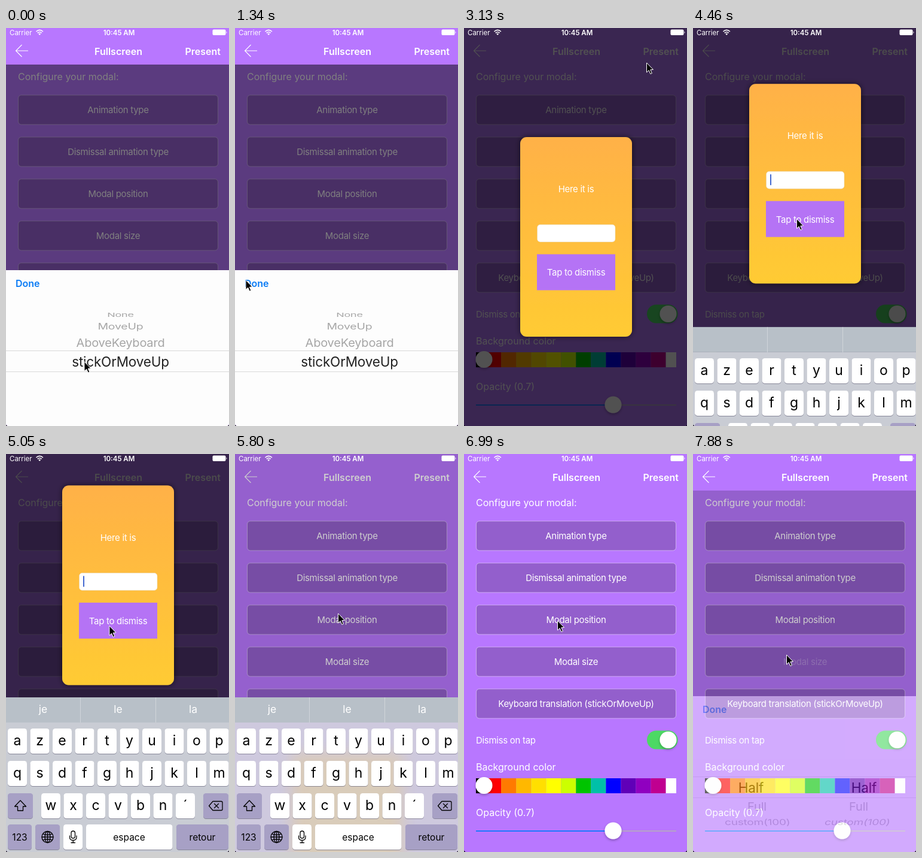
Recreate the animation shown at these times as an HTML page. Size 373 by 664 pixels, loop 8000 ms.

```html
<!DOCTYPE html>
<html lang="en">
<head>
<meta charset="utf-8">
<title>Modal configurator</title>
<style>
  html, body { margin: 0; width: 100%; height: 100%; overflow: hidden; background: #000; }
  svg { display: block; width: 100%; height: 100%; }
  text { font-family: Inter, "Open Sans", sans-serif; fill: #fff; white-space: pre; }
  .mid { text-anchor: middle; }
  .nav { font-size: 16px; font-weight: 600; }
  .head { font-size: 16px; }
  .label { font-size: 15px; letter-spacing: -.3px; }
  .status { font-size: 11.5px; }
  .wheel { text-anchor: middle; font-size: 22px; letter-spacing: -.2px; fill: #222; }
  .far { fill: #a6a6a6; }
  .key { text-anchor: middle; font-size: 23px; fill: #000; }
  .word { text-anchor: middle; font-size: 15.5px; fill: #000; }
  .hint { text-anchor: middle; font-size: 17.5px; }
  .icon { fill: none; stroke: #000; stroke-width: 1.3; stroke-linejoin: round; stroke-linecap: round; }
</style>
</head>
<body>
<svg viewBox="0 0 373 664">
  <defs>
    <linearGradient id="sun" x2="0" y2="1">
      <stop offset="0" stop-color="#ffb147"/>
      <stop offset="1" stop-color="#ffcb33"/>
    </linearGradient>
    <filter id="lift" x="-50%" y="-50%" width="200%" height="200%">
      <feDropShadow dx="0" dy="2" stdDeviation="2" flood-opacity=".3"/>
    </filter>
    <filter id="halo" x="-20%" y="-20%" width="140%" height="140%">
      <feDropShadow dx="0" dy="0" stdDeviation="5" flood-opacity=".6"/>
    </filter>
    <filter id="blur" x="-30%" y="-30%" width="160%" height="160%">
      <feGaussianBlur stdDeviation="12"/>
    </filter>
    <clipPath id="screen"><path d="M0 0H373V660Q373 664 369 664H4Q0 664 0 660Z"/></clipPath>
    <clipPath id="board"><rect y="42" width="373" height="216"/></clipPath>
  </defs>

  <g clip-path="url(#screen)">
    <rect width="373" height="664" fill="#b877ff"/>
    <path d="M37 38H16.500M26.500 28L16.500 38L26.500 48" fill="none" stroke="#fff" stroke-width="1.100"/>
    <text class="nav mid" x="188" y="45">Fullscreen</text>
    <text class="nav" id="present" x="359" y="45" text-anchor="end">Present</text>
    <text class="head" x="20" y="87">Configure your modal:</text>
    <g id="buttons"></g>

    <text class="label" x="20" y="483">Dismiss on tap</text>
    <rect x="306" y="461.500" width="51.500" height="31" rx="15.500" fill="#4cd964"/>
    <text class="head" x="20" y="528">Background color</text>
    <g id="swatches"></g>
    <text class="head" x="20" y="604">Opacity (0.7)</text>
    <path d="M249 629H355" stroke="#b5a3c6" stroke-width="2"/>
    <path d="M20 629H249" stroke="#1b78ff" stroke-width="2"/>
    <g fill="#fff" filter="url(#lift)">
      <circle cx="341.500" cy="477" r="14"/>
      <circle cx="33.500" cy="553" r="14"/>
      <circle cx="249.500" cy="628.500" r="14"/>
    </g>

    <rect id="shade" y="61" width="373" height="343"/>
    <g id="panel">
      <rect y="404" width="373" height="260" fill="#fdfdfd"/>
      <path d="M0 538.500H373M0 573.500H373" stroke="#d9d9d9"/>
      <text class="nav" x="16" y="432" style="fill:#0a7bf5">Done</text>
      <g id="translations"></g>
      <g id="sizes"></g>
    </g>

    <rect id="dim" width="373" height="664"/>
    <g id="modal">
      <rect x="94" width="187" height="333" rx="11" fill="url(#sun)" filter="url(#halo)"/>
      <text class="label mid" x="187.500" y="92">Here it is</text>
      <rect x="122.500" y="146" width="130.500" height="29" rx="5" fill="#fff" stroke="#e3d3b0" stroke-width=".5"/>
      <rect id="caret" x="129" y="151" width="2" height="18" fill="#4469d0"/>
      <rect x="122" y="195.500" width="131" height="60" fill="#b573f5"/>
      <text class="label mid" x="187.500" y="231.500">Tap to dismiss</text>
    </g>

    <g id="keyboard">
      <rect y="42" width="373" height="216" fill="#c9ccd4"/>
      <rect id="tint" y="42" width="373" height="216" fill="#d1c8e2"/>
      <g clip-path="url(#board)">
        <rect id="glow" x="94" width="187" height="333" fill="#ffd34a" opacity=".24" filter="url(#blur)"/>
      </g>
      <rect width="373" height="42" fill="#b8c0c8"/>
      <path d="M124.500 0V42M250.500 0V42" stroke="#d0d5da"/>
      <g id="hints"></g>
      <g id="keys"></g>
      <g class="icon">
        <path d="M24 172L33.500 182H28.500V189H19.500V182H14.500Z"/>
        <path d="M346 173.500H360Q362 173.500 362 175.500V186.500Q362 188.500 360 188.500H346L339.500 181ZM348.500 177.500L355.500 184.500M355.500 177.500L348.500 184.500"/>
        <circle cx="69.500" cy="233" r="9.500"/>
        <ellipse cx="69.500" cy="233" rx="4.500" ry="9.500"/>
        <path d="M69.500 223.500V242.500M60 233H79M62 228Q69.500 231 77 228M62 238Q69.500 235 77 238"/>
        <rect x="109" y="223" width="6.500" height="12" rx="3.250"/>
        <path d="M106.500 231V233Q106.500 238.500 112.250 238.500Q118 238.500 118 233V231M112.250 238.500V242.500M109 242.500H115.500"/>
      </g>
    </g>

    <g>
      <text class="status" x="6" y="11.500">Carrier</text>
      <g fill="none" stroke="#fff" stroke-width="1.600">
        <path d="M50.500 6Q56.200 .8 61.900 6M52.700 8.300Q56.200 5.200 59.700 8.300"/>
      </g>
      <path d="M56.200 12L54.200 9.800Q56.200 8.300 58.200 9.800Z" fill="#fff"/>
      <text class="status mid" x="189" y="11.500" font-weight="600">10:45 AM</text>
      <rect x="345.500" y="2.500" width="22" height="9.500" rx="2" fill="#fff"/>
      <path d="M368.500 5.500Q370.500 7.250 368.500 9Z" fill="#fff"/>
    </g>
  </g>

  <path id="cursor" d="M0 0V16L3.700 12.600L6.300 18.600L8.900 17.500L6.300 11.700L11 11.400Z" fill="#000" stroke="#fff"/>
</svg>

<script>
const LOOP = 8000, TICK = 148.7;
const $ = id => document.getElementById(id);
const fill = (id, parts) => { $(id).innerHTML = parts.join(''); };
const text = (cls, x, y, label, extra = '') =>
  `<text class="${cls}" x="${x}" y="${y}" ${extra}>${label}</text>`;

fill('buttons', ['Animation type', 'Dismissal animation type', 'Modal position', 'Modal size',
  'Keyboard translation (stickOrMoveUp)'].map((label, i) => {
  const y = 112 + 70 * i;
  return `<rect x="20.5" y="${y}" width="334" height="49" rx="5" fill="#000" fill-opacity=".2"
    stroke="#fff" stroke-opacity=".42"/>` + text('label mid', 187.5, y + 30, label);
}));
const sizeLabel = $('buttons').querySelectorAll('text')[3];

const colors = ['#000', '#f00', '#ff7a00', '#ffb800', '#ffdf00', '#ff0', '#cf0', '#00c400',
  '#00c0a8', '#00f', '#6000b8', '#9000c0', '#c00090', '#fff'];
fill('swatches', colors.map((color, i) => {
  const left = i ? 12 + 25.05 * i : 20, right = Math.min(355, 37.05 + 25.05 * i);
  return `<rect x="${left}" y="541" width="${right - left}" height="25" fill="${color}"/>`;
}));

// Wheel rows are flattened vertically as they turn away.
const row = (label, x, y, size, flat, far = true, skew = 0) =>
  text(far ? 'wheel far' : 'wheel', 0, 0, label,
    `style="font-size:${size}px" transform="translate(${x} ${y}) skewX(${skew}) scale(1 ${flat})"`);

fill('translations', [
  row('None', 191.5, 482, 18, .52), row('MoveUp', 191.5, 503, 19.5, .75),
  row('AboveKeyboard', 191.5, 531.5, 20, .95), row('stickOrMoveUp', 191.5, 564.5, 22.5, 1, false)
]);
fill('sizes', [[97, 107, 108, 3], [286, 277, 274, -12]].map(([a, b, c, skew]) =>
  row('Half', a, 564.5, 22.5, 1, false) + row('Full', b, 594.5, 20, .95) +
  row('custom(100)', c, 619, 19, .72, true, skew)));

const cap = (x, y, w, special) =>
  `<rect x="${x}" y="${y + 1}" width="${w}" height="42" rx="4.5" fill="#55506a" opacity=".55"/>` +
  (special ? `<rect x="${x}" y="${y}" width="${w}" height="42" rx="4.5" fill="#c9c3dc"/>` : '') +
  `<rect x="${x}" y="${y}" width="${w}" height="42" rx="4.5"
    fill="${special ? '#483c84' : '#fff'}" fill-opacity="${special ? .26 : 1}"/>`;
const letters = (chars, x0, y) => [...chars].map((c, i) => {
  const x = x0 + 37.5 * i;
  return cap(x, y, 32) + text('key', x + 16, y + 28, c);
}).join('');
fill('keys', [
  letters('azertyuiop', 3, 52), letters('qsdfghjklm', 3, 106), letters('wxcvbn´', 59, 160),
  cap(3, 160, 42, true), cap(330, 160, 42, true),
  cap(3, 212, 40, true), cap(49, 212, 41, true), cap(96, 212, 32),
  cap(134, 212, 144.5), cap(285, 212, 87, true),
  text('word', 23, 238.5, '123'), text('word', 206, 238.5, 'espace'), text('word', 328.5, 238.5, 'retour')
]);
fill('hints', ['je', 'le', 'la'].map((word, i) => text('hint', 62 + 125.5 * i, 26, word)));

// Tracks: [tick, value, ...]
const tracks = {
  cursor: [[3, 131, 556.5], [9, 18, 420.5], [10, 18, 420.5], [17, 314.5, 38], [20, 314.5, 38],
    [21, 305.5, 58], [26, 173.5, 318.5], [30, 173.5, 318.5], [37, 172.5, 266], [39, 172.5, 266],
    [46, 156.5, 283], [47, 156.5, 278], [48, 156.5, 278], [49, 156.5, 303], [50, 156.5, 335]],
  panel: [[10, 1], [11, .5], [12, 0], [52, 0], [53, .39]],
  enter: [[19, 0], [20, .35], [21, .967], [22, 1]],
  leave: [[38, 0], [39, .73], [40, 1]],
  board: [[29, 0], [30, .64], [31, .97], [32, 1], [39, 1], [40, .6], [41, .08], [42, 0]]
};

function at(name, tick) {
  const keys = tracks[name], i = keys.findIndex(k => k[0] > tick);
  if (i === 0) return keys[0].slice(1);
  if (i < 0) return keys[keys.length - 1].slice(1);
  const a = keys[i - 1], b = keys[i], u = (tick - a[0]) / (b[0] - a[0]), e = u * u * (3 - 2 * u);
  return a.slice(1).map((v, j) => v + (b[j + 1] - v) * e);
}

const move = (id, x, y) => $(id).setAttribute('transform', `translate(${x} ${y})`);
const fade = (el, value) => el.setAttribute('opacity', value);
const show = (id, on) => $(id).setAttribute('visibility', on ? 'inherit' : 'hidden');

function draw(ms) {
  const tick = Math.floor(ms / TICK + .042);
  const [panel] = at('panel', tick), [enter] = at('enter', tick);
  const [leave] = at('leave', tick), [board] = at('board', tick);

  move('cursor', ...at('cursor', tick));
  fade($('panel'), panel);
  fade($('shade'), panel * .5);
  show('translations', tick < 30);
  show('sizes', tick >= 30);
  fade($('present'), tick === 18 || tick === 19 ? .25 : 1);
  fade(sizeLabel, tick === 53 ? .25 : 1);

  const visible = enter * (1 - leave);
  const modalY = tick < 38 ? 664 - 498.5 * enter - 113 * board : 52.5 + 611.5 * leave;
  const boardY = 664 - 258 * board;
  fade($('dim'), .705 * visible);
  move('modal', 0, modalY);
  show('modal', visible > 0);
  show('caret', tick >= 30);

  move('keyboard', 0, boardY);
  show('keyboard', board > 0);
  show('hints', tick >= 32);
  fade($('tint'), 1 - visible);
  $('glow').setAttribute('y', modalY - boardY);
}

function loop(now) {
  draw(now % LOOP);
  requestAnimationFrame(loop);
}
draw(0);
requestAnimationFrame(loop);
</script>
</body>
</html>
```
